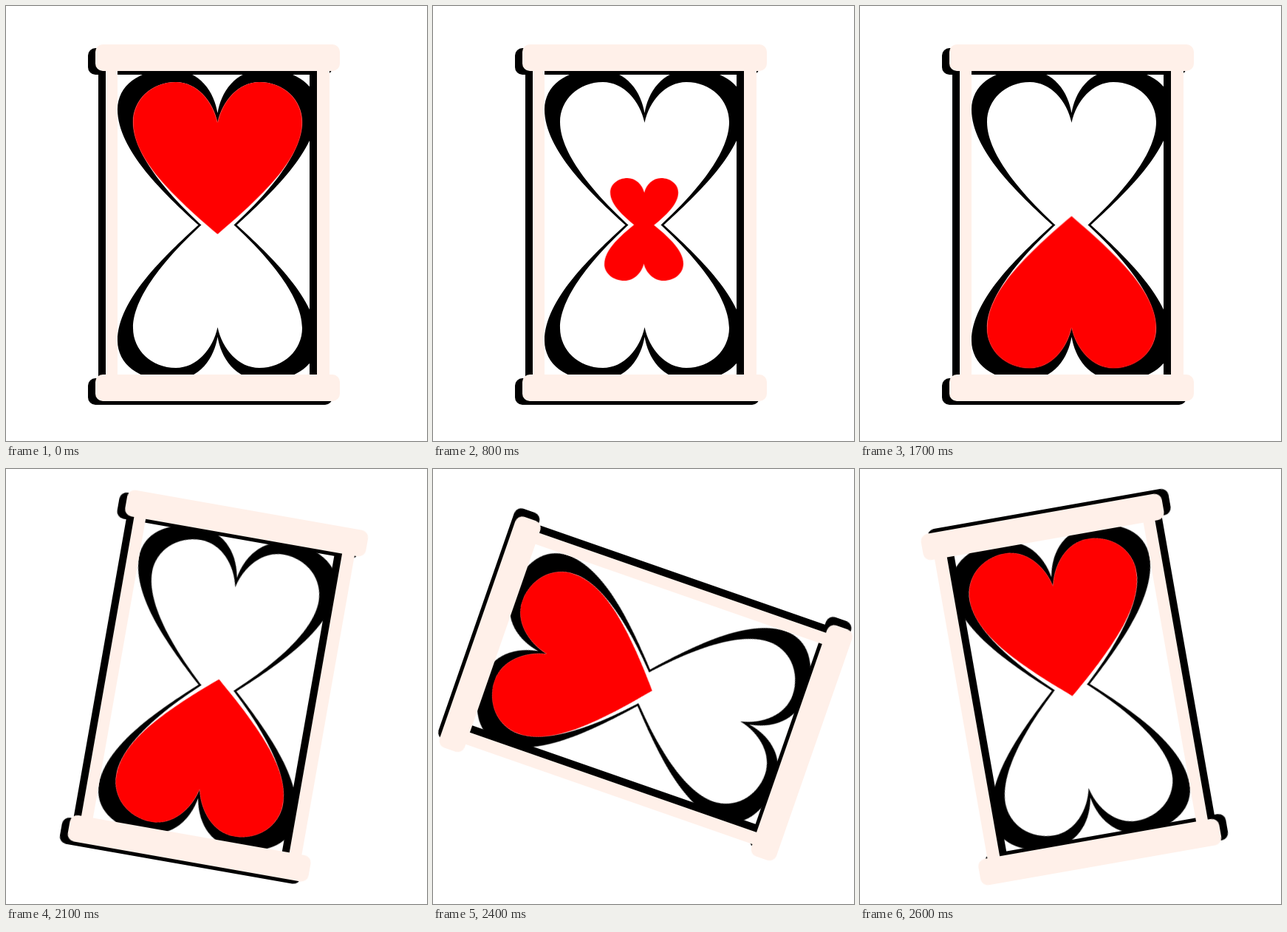
Write an HTML page that moves like this. It is 570 px wide and 589 px high and loops after 2700 ms.

```html
<!DOCTYPE html>
<html lang="en">
<head>
<meta charset="utf-8">
<title>Heart hourglass</title>
<style>
  html, body { margin: 0; width: 100%; height: 100%; overflow: hidden; background: #fff; }
  svg { display: block; width: 100%; height: 100%; }

  .turn, .upper, .lower { animation: 2.7s infinite; }
  .turn { transform-origin: 286px 296px; animation-name: turn; }
  .sand { fill: #f00; }
  .upper { animation-name: drain; }
  .lower { animation-name: fill; }

  @keyframes drain {
    0%      { transform: translate(286.5px, 309px) scale(1, 1); animation-timing-function: steps(6); }
    22.222% { transform: translate(286px, 307px) scale(.677, .607); animation-timing-function: steps(2); }
    29.629% { transform: translate(286px, 307px) scale(.402, .359); animation-timing-function: steps(3); }
    40.74%, 100% { transform: translate(286px, 300px) scale(0, 0); }
  }

  @keyframes fill {
    0%      { transform: translate(285.5px, 286px) scale(0, 0); animation-timing-function: step-end; }
    7.407%  { transform: translate(285.5px, 286px) scale(0, 0); animation-timing-function: steps(4); }
    22.222% { transform: translate(285.5px, 286px) scale(.304, -.272); animation-timing-function: steps(2); }
    29.629% { transform: translate(285.5px, 286px) scale(.467, -.417); animation-timing-function: steps(4); }
    44.444% { transform: translate(285.5px, 286px) scale(.843, -.754); animation-timing-function: steps(5); }
    62.962%, 100% { transform: translate(286.5px, 284.5px) scale(1, -1); }
  }

  /* Half turn, eased in and out, in 100 ms steps */
  @keyframes turn {
    0%      { transform: rotate(0deg); animation-timing-function: step-end; }
    77.777% { transform: rotate(10deg); animation-timing-function: step-end; }
    81.481% { transform: rotate(35.7deg); animation-timing-function: step-end; }
    85.185% { transform: rotate(70.8deg); animation-timing-function: step-end; }
    88.888% { transform: rotate(109.2deg); animation-timing-function: step-end; }
    92.592% { transform: rotate(144.3deg); animation-timing-function: step-end; }
    96.296%, 100% { transform: rotate(170deg); animation-timing-function: step-end; }
  }
</style>
</head>
<body>
<svg viewBox="0 0 570 589">
  <defs>
    <g id="frame">
      <rect x="135" y="80" width="16" height="430"/>
      <rect x="421" y="80" width="17" height="430"/>
      <rect x="121" y="52" width="331" height="36" rx="10"/>
      <rect x="121" y="499" width="331" height="36" rx="10"/>
    </g>
    <path id="rim" d="M0-151.5C-4.5-178.5-22.5-210.5-64.5-210.5C-106.5-210.5-135.5-188.5-135.5-156.5C-135.5-101.5-71.5-41.5-25.5 .5H25.5C71.5-41.5 135.5-101.5 135.5-156.5C135.5-188.5 106.5-210.5 64.5-210.5C22.5-210.5 4.5-178.5 0-151.5Z"/>
    <path id="bulb" d="M0-138.5C-6.5-168.5-28.5-193.5-56.5-193.5C-89.5-193.5-114.5-169.5-114.5-139.5C-114.5-93.5-61.5-36.5-21.5 .5H21.5C61.5-36.5 114.5-93.5 114.5-139.5C114.5-169.5 89.5-193.5 56.5-193.5C28.5-193.5 6.5-168.5 0-138.5Z"/>
    <path id="heart" d="M0-151C-6.5-181-28.5-206-56.5-206C-89.5-206-114.5-182-114.5-152C-114.5-106-69.5-59 0 0C69.5-59 114.5-106 114.5-152C114.5-182 89.5-206 56.5-206C28.5-206 6.5-181 0-151Z"/>
  </defs>

  <g class="turn">
    <g transform="translate(286.5 296.5)">
      <use href="#rim"/>
      <use href="#rim" transform="scale(1 -1)"/>
      <g fill="#fff">
        <use href="#bulb"/>
        <use href="#bulb" transform="scale(1 -1)"/>
      </g>
    </g>
    <g class="sand">
      <g class="upper"><use href="#heart"/></g>
      <g class="lower"><use href="#heart"/></g>
    </g>
    <use href="#frame" transform="translate(-10 5)"/>
    <use href="#frame" fill="#fff0e9"/>
  </g>
</svg>
</body>
</html>
```
